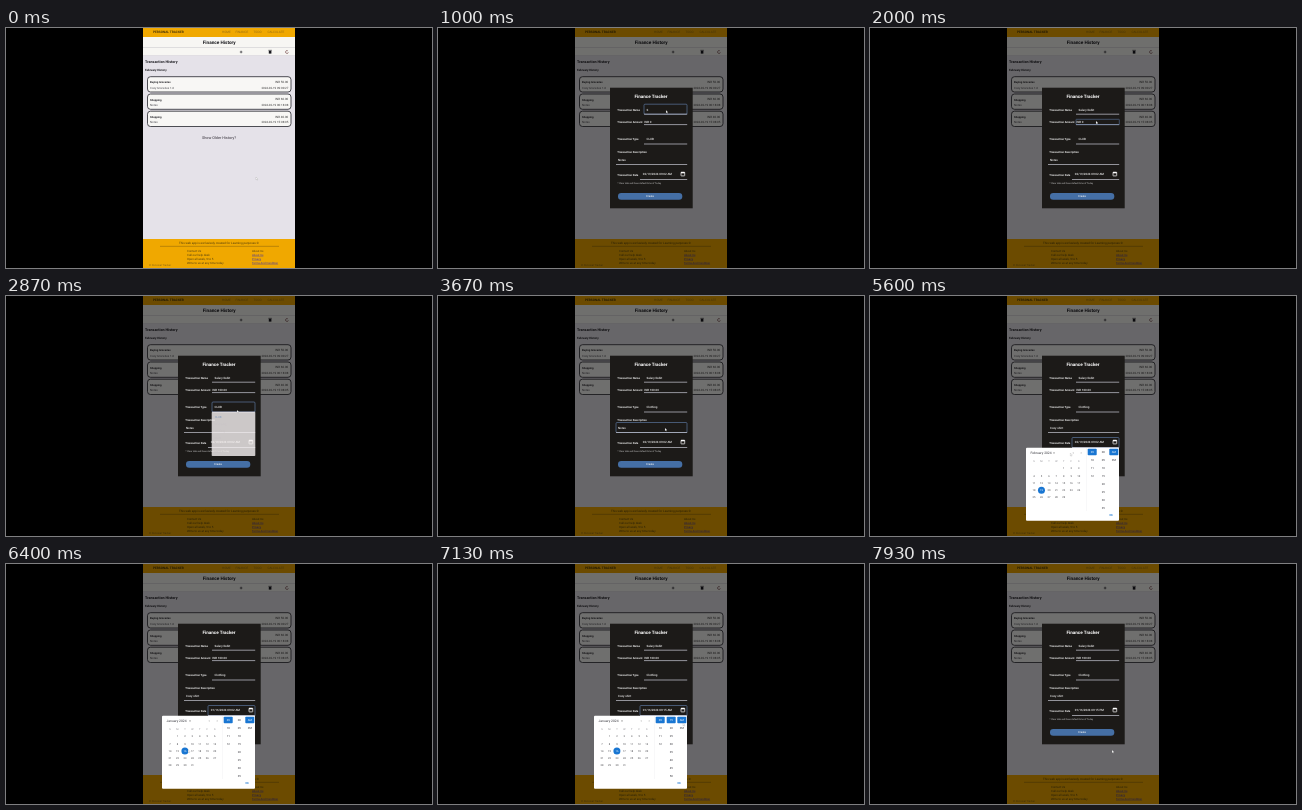
Recreate the animation shown at these times as an HTML page with a canvas. Size 426 px wide and 240 px high, loop 8000 ms.

```html
<!DOCTYPE html>
<html lang="en">
<head>
<meta charset="utf-8">
<title>Finance tracker</title>
<style>
html, body { margin: 0; width: 100%; height: 100%; overflow: hidden; background: #000; }
canvas { display: block; width: 100vw; height: 100vh; }
</style>
</head>
<body>
<canvas id="stage"></canvas>
<script>
const W = 426, H = 240, LOOP = 8000;
const canvas = document.getElementById('stage');
const ctx = canvas.getContext('2d');
const BLUE = '#1976d2', INK = '#17171c', ORANGE = '#f0a800';

const clamp = v => Math.max(0, Math.min(1, v));
const ease = v => { v = clamp(v); return v * v * (3 - 2 * v); };
const progress = (t, start, length) => ease((t - start) / length);

function rect(x, y, w, h, fill) {
  ctx.fillStyle = fill;
  ctx.fillRect(x, y, w, h);
}

function box(x, y, w, h, r, fill, stroke, width = 0.7) {
  ctx.beginPath();
  ctx.roundRect(x, y, w, h, r);
  if (fill) { ctx.fillStyle = fill; ctx.fill(); }
  if (stroke) { ctx.strokeStyle = stroke; ctx.lineWidth = width; ctx.stroke(); }
}

function line(x1, y1, x2, y2, color, width = 0.6) {
  ctx.beginPath();
  ctx.moveTo(x1, y1);
  ctx.lineTo(x2, y2);
  ctx.strokeStyle = color;
  ctx.lineWidth = width;
  ctx.stroke();
}

function text(str, x, y, size, color = INK, weight = 400, align = 'left') {
  ctx.font = `${weight} ${size}px Roboto, "Open Sans", sans-serif`;
  ctx.textAlign = align;
  ctx.fillStyle = color;
  ctx.fillText(str, x, y);
}

function typed(str, t, start, length) {
  return str.slice(0, Math.floor(clamp((t - start) / length) * str.length));
}

function drawCard(y, title, note, amount, date) {
  box(141.5, y, 143.5, 15.3, 3, '#f8f7f5', '#25252c', 0.8);
  text(title, 144, y + 5.8, 2.7, INK, 700);
  text(note, 144, y + 11.4, 2.9, '#44444a');
  text(amount, 282.3, y + 5.6, 3, '#333', 400, 'right');
  text(date, 282.3, y + 11.4, 2.95, '#333', 400, 'right');
}

function drawToolbar() {
  line(233.8, 24, 236.4, 24, INK, 0.6);
  line(235.1, 22.7, 235.1, 25.3, INK, 0.6);
  rect(262.8, 22.7, 2.6, 2.9, INK);
  line(262.3, 22.3, 265.9, 22.3, INK, 0.5);
  ctx.beginPath();
  ctx.arc(281, 24, 1.4, 0.3, 5.4);
  ctx.strokeStyle = '#6d4040';
  ctx.lineWidth = 0.7;
  ctx.stroke();
}

function drawPage() {
  rect(137, 0, 152, H, '#e5e2e9');
  rect(137, 0, 152, 9, ORANGE);
  rect(137, 9, 152, 18.5, '#f7f6f3');
  line(137, 19.5, 289, 19.5, '#cfcdd0', 0.6);
  line(137, 27.5, 289, 27.5, '#d3d0d6', 0.5);
  text('PERSONAL TRACKER', 147, 4.3, 3.2, '#2d2108', 500);
  [['HOME', 216], ['FINANCE', 229.5], ['TODO', 247.5], ['CALCULATE', 261.5]]
    .forEach(([label, x]) => text(label, x, 4.3, 3.1, '#946b12'));
  text('Finance History', 213.2, 14.5, 4.7, INK, 700, 'center');
  drawToolbar();

  text('Transaction History', 139, 34.2, 3.7, INK, 700);
  text('February History', 139, 42.3, 2.9, INK, 700);
  drawCard(48.7, 'Buying Groceries', 'Cozy Groceries 1-0', 'INR 50.00', '2024-02-19 09:00:27');
  drawCard(66, 'Shopping', 'Notes', 'INR 60.00', '2024-02-19 00:18:08');
  drawCard(83.2, 'Shopping', 'Notes', 'INR 40.00', '2024-02-19 15:08:05');
  text('Show Older History?', 213, 109.8, 3.8, '#343039', 400, 'center');

  rect(137, 211, 152, 29, ORANGE);
  text('This web app is exclusively created for Learning purposes ©', 213, 215.5, 3, '#4a380b', 400, 'center');
  line(154, 218.3, 273, 218.3, '#815c0b', 0.5);
  ['Contact Us', 'Call our help desk', 'Open all week, 9 to 5', 'Write to us at any time today']
    .forEach((s, i) => text(s, 181, 223 + i * 4, 2.9, '#4b3b13'));
  ['About Us', 'About Us', 'Privacy', 'Terms And Condition'].forEach((s, i) => {
    text(s, 246, 223 + i * 4, 2.8, i ? '#4435a5' : '#4b3b13');
    if (i) line(246, 224.4 + i * 4, 246 + ctx.measureText(s).width, 224.4 + i * 4, '#4435a5', 0.3);
  });
  text('© Personal Tracker', 143, 237, 2.6, '#806017');
}

function drawField(label, value, labelY, x, valueX, valueY, lineY, focused) {
  text(label, 179.3, labelY, 2.75, '#f3f3f3', 700);
  text(value, valueX, valueY, 2.95, '#f2f2f2', 500);
  if (focused) box(x, lineY - 10, 249 - x, 10, 1, null, '#6685b3', 0.6);
  line(x, lineY, 249.2, lineY, '#c9c9d4', 0.7);
}

function dateValue(t) {
  const day = t < 6250 ? '02/19/2024' : '01/16/2024';
  const minute = t < 6750 ? '02' : '15';
  return `${day} 09:${minute} ${t < 7300 ? 'AM' : 'PM'}`;
}

function drawModal(t) {
  rect(172, 59.7, 82.7, 120.6, '#1c1a18');
  text('Finance Tracker', 213, 68.7, 4.6, '#fff', 700, 'center');

  const type = t < 3400 ? 'CLUB' : 'Clothing';
  const note = t < 3750 ? 'Notes' : typed('Cozy shirt', t, 3750, 600);
  const amount = t < 2100 ? 'INR 0' : 'INR ' + typed('100.00', t, 2050, 550);
  drawField('Transaction Name', typed('Salary Debit', t, 900, 700), 82.2, 206, 208.5, 81.8, 86.2, t > 850 && t < 1700);
  drawField('Transaction Amount', amount, 94.5, 206, 206.3, 94.2, 96.6, false);
  if (t > 1700 && t < 2650) box(206, 91.3, 43.3, 5.3, 0.5, null, '#6685b3', 0.5);
  drawField('Transaction Type', type, 111.2, 206, 208.5, 111, 116, t > 2650 && t < 3500);
  drawField('Transaction Description', note, 123.8, 178, 180, 132.2, 136.5, t > 3600 && t < 4900);
  drawField('Transaction Date', dateValue(t), 146.7, 202, 204.8, 146.2, 151.5, t > 4900 && t < 7600);

  box(243, 144.2, 3.7, 3.7, 0.4, null, '#fff', 0.7);
  rect(243, 144, 3.7, 1.3, '#fff');
  text('* Clear date will have default time of Today', 179.5, 155.7, 2.3, '#d2d2d2');
  box(180, 165, 64.3, 6.7, 3.3, '#456fa5');
  text('Create', 212, 168.5, 2.7, '#f5f5f5', 500, 'center');
}

function drawDropdown(t) {
  const open = t < 3400 ? clamp((t - 2750) / 150) : 1 - clamp((t - 3400) / 150);
  if (open <= 0) return;
  ctx.save();
  ctx.globalAlpha = open;
  box(205.7, 116, 43.6, 44, 0.8, '#f7f2f2');
  ['CLUB', 'Shopping', 'Clothing', 'Food', 'Travel', 'Other'].forEach((s, i) =>
    text(s, 208.7, 121.2 + i * 7, 2.8, i ? '#c9c4c7' : '#6a8cba'));
  ctx.restore();
}

function drawTimeColumn(x, items, selected) {
  items.forEach((label, i) => {
    const y = 156 + i * 8;
    if (i === selected) box(x - 4.5, y - 3.3, 9, 6.6, 0.8, BLUE);
    text(label, x, y, 2.8, i === selected ? '#fff' : '#33333a', 400, 'center');
  });
}

function drawMonth(name, firstColumn, days, selected) {
  text(name, 160.5, 157.2, 3.3, '#33333a');
  for (let day = 1; day <= days; day++) {
    const cell = firstColumn + day - 1;
    const x = 164 + (cell % 7) * 7.45, y = 172.7 + Math.floor(cell / 7) * 7.2;
    if (day === selected) {
      ctx.beginPath();
      ctx.arc(x, y, 3.5, 0, 7);
      ctx.fillStyle = BLUE;
      ctx.fill();
    }
    text(day, x, y, 2.6, day === selected ? '#fff' : '#3d3d42', 400, 'center');
  }
}

function drawPicker(t) {
  const open = clamp((t - 5000) / 150) * (1 - clamp((t - 7550) / 150));
  if (open <= 0) return;
  ctx.save();
  ctx.globalAlpha = open;
  box(156, 151.8, 93, 73, 1, '#fff');
  ctx.beginPath();
  ctx.rect(156, 151.8, 93, 73);
  ctx.clip();

  if (t < 5900) drawMonth('February 2024', 4, 29, 19);
  else drawMonth('January 2024', 1, 31, t < 6250 ? 0 : 16);
  text('▾', 183.2, 157, 3, '#666');
  text('‹', 203, 156.8, 4, '#666', 400, 'center');
  text('›', 211, 156.8, 4, '#666', 400, 'center');
  [...'SMTWTFS'].forEach((d, i) => text(d, 164 + i * 7.45, 165, 2.5, '#85858b', 400, 'center'));

  const minuteChosen = t >= 6750, afternoon = t >= 7300;
  const minutes = Array.from({ length: 8 }, (_, i) =>
    String(i * 5 + (minuteChosen ? 15 : 0)).padStart(2, '0'));
  line(216.5, 152, 216.5, 215, '#e8e8ea', 0.3);
  drawTimeColumn(222.2, ['09', '10', '11', '12'], 0);
  drawTimeColumn(233.2, minutes, minuteChosen ? 0 : -1);
  drawTimeColumn(243.8, ['AM', 'PM'], afternoon ? 1 : 0);
  text('OK', 241, 219.5, 2.8, BLUE, 500, 'center');
  ctx.restore();
}

const pointerPath = [
  [0, 250, 150], [400, 236, 26], [550, 236, 26], [800, 228, 83], [1600, 228, 84],
  [1800, 226, 94], [2500, 226, 94], [2750, 231, 114], [2900, 231, 115],
  [3350, 222, 135], [3650, 227, 133], [4550, 227, 133], [4900, 245, 146],
  [5100, 245, 146], [5500, 200, 158], [5900, 202, 158], [6200, 179, 187],
  [6350, 179, 187], [6700, 233, 180], [7130, 245, 160], [7300, 244, 164],
  [7520, 241, 219], [7650, 241, 219], [7900, 242, 187], [8000, 242, 187]
];

function drawPointer(t) {
  const i = Math.max(1, pointerPath.findIndex(p => p[0] > t));
  const [t0, x0, y0] = pointerPath[i - 1], [t1, x1, y1] = pointerPath[i];
  const k = progress(t, t0, t1 - t0);
  ctx.save();
  ctx.translate(x0 + (x1 - x0) * k, y0 + (y1 - y0) * k);
  ctx.beginPath();
  [[0, -1], [0, 2], [0.7, 1.4], [1.2, 2.3], [1.6, 2], [1.2, 1.2], [2, 1.1]]
    .forEach(([x, y]) => ctx.lineTo(x, y));
  ctx.closePath();
  ctx.fillStyle = '#fff';
  ctx.strokeStyle = '#555';
  ctx.lineWidth = 0.15;
  ctx.fill();
  ctx.stroke();
  ctx.restore();
}

function draw(t) {
  rect(0, 0, W, H, '#000');
  drawPage();
  const open = progress(t, 550, 200);
  if (open > 0) {
    rect(137, 0, 152, H, `rgba(0, 0, 0, ${0.55 * open})`);
    ctx.save();
    ctx.globalAlpha = open;
    drawModal(t);
    ctx.restore();
    drawDropdown(t);
    drawPicker(t);
  }
  drawPointer(t);
}

function frame() {
  const ratio = devicePixelRatio || 1;
  const width = Math.round(innerWidth * ratio), height = Math.round(innerHeight * ratio);
  if (canvas.width !== width || canvas.height !== height) {
    canvas.width = width;
    canvas.height = height;
  }
  ctx.setTransform(width / W, 0, 0, height / H, 0, 0);
  ctx.textBaseline = 'middle';
  ctx.textRendering = 'geometricPrecision';
  draw(performance.now() % LOOP);
  requestAnimationFrame(frame);
}
frame();
</script>
</body>
</html>
```
